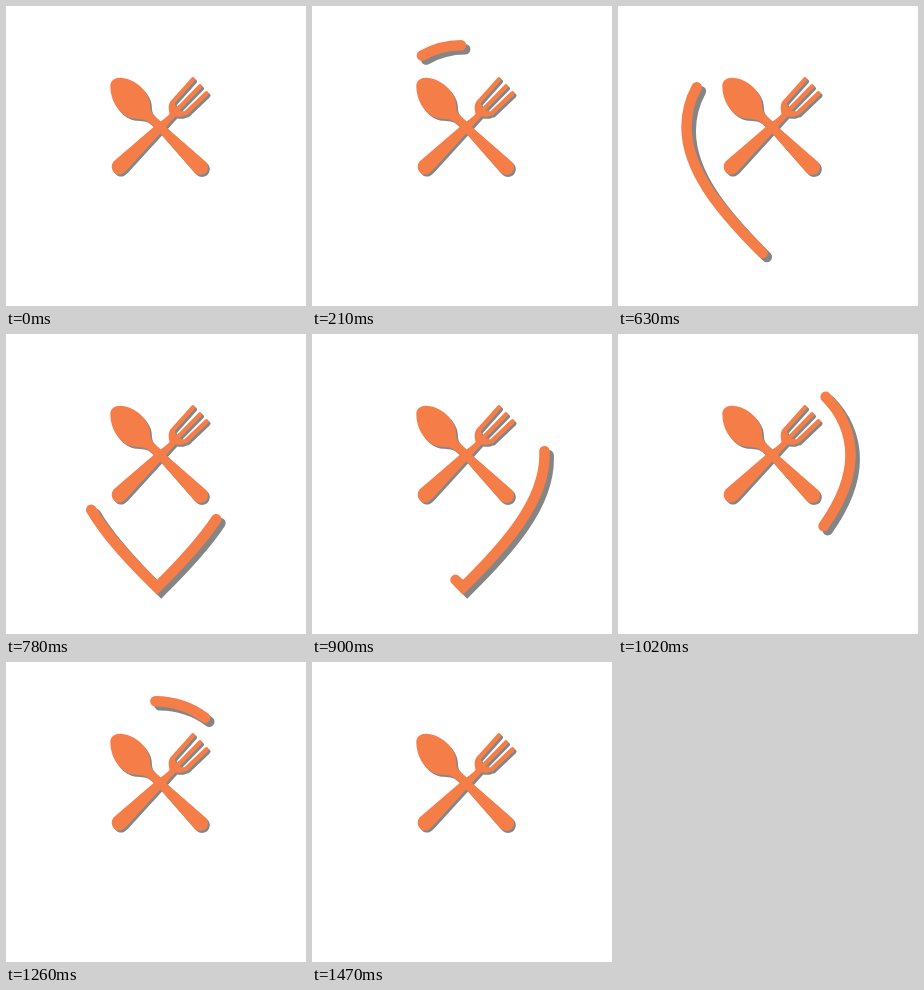
These frames come from a looping animation (300 by 300 pixels, 1.8 s). An HTML page with a canvas:

```html
<!DOCTYPE html>
<html lang="en">
<head>
<meta charset="utf-8">
<title>Restaurant pin loader</title>
<style>
  html, body { margin: 0; width: 100%; height: 100%; overflow: hidden; background: #fff; }
  canvas { display: block; }
</style>
</head>
<body>
<canvas id="stage" width="300" height="300"></canvas>
<script>
const ctx = document.getElementById('stage').getContext('2d');
const LOOP = 1800, STEP = 30;
const ORANGE = '#f57d48', SHADOW = '#858585';

// Map pin outline, counterclockwise from the top
const pinData = 'M149 39.3 A80.5 82 0 0 0 68.5 121.3 C68.5 168 109 212 151 253.3' +
  ' C193 212 232.5 168 232.5 121.3 A83.5 82 0 0 0 149 39.3';
const pin = new Path2D(pinData);
const pinShape = document.createElementNS('http://www.w3.org/2000/svg', 'path');
pinShape.setAttribute('d', pinData);
const pinLength = pinShape.getTotalLength();

const spoon = new Path2D('M104.3 80 C104.3 74 110 71 116 72 C129 73 140 84 143 93' +
  ' C145 99 143 104 147 108 C150 112 154 114 157 118.5 L200 156' +
  ' C203.5 160 202 165 199 167.5 C195 170 191 169 188 166 L153 126' +
  ' C149 122 146 118.5 141 115 C135 111.5 130 114.5 123 111.5 C112 107 104.3 94 104.3 80Z');
const fork = new Path2D('M107.5 155.5 L150 119 C155 115 161 111 163.5 108' +
  ' C163 104 161.5 100 164.5 95.5 L169 97.5 L171 104 L177 105 L182 107' +
  ' C178 111.5 174 111 169.5 110.5 C166 114 162 119 157 124.5 L120 165' +
  ' C116 169.5 111 169.5 108.5 166.5 C105 164 105 159 107.5 155.5Z');
const tines = new Path2D('M166 97 L187 73.5 M171.5 103.5 L194 80.5 M180 107 L200.5 87.5');

function withShadow(dx, dy, draw) {
  for (const [color, x, y] of [[SHADOW, dx, dy], [ORANGE, 0, 0]]) {
    ctx.save();
    ctx.translate(x, y);
    ctx.fillStyle = ctx.strokeStyle = color;
    draw();
    ctx.restore();
  }
}

function drawCutlery() {
  ctx.fill(spoon);
  ctx.fill(fork);
  ctx.lineWidth = 4.5;
  ctx.lineCap = 'round';
  ctx.stroke(tines);
}

function ease(t, start, end) {
  const u = Math.min(1, Math.max(0, (t - start) / (end - start)));
  return u * u * (3 - 2 * u);
}

function drawPin(t) {
  const tail = ease(t, 360, 1470) * pinLength;
  const head = ease(t, 0, 1290) * pinLength;
  if (head <= tail) return;
  ctx.lineWidth = 10.5;
  ctx.lineCap = 'round';
  ctx.lineJoin = 'miter';
  ctx.setLineDash([head - tail, pinLength * 2]);
  ctx.lineDashOffset = -tail;
  ctx.stroke(pin);
}

function render(now) {
  const t = Math.floor((now % LOOP) / STEP) * STEP;
  ctx.fillStyle = '#fff';
  ctx.fillRect(0, 0, 300, 300);
  withShadow(4.2, 4, () => drawPin(t));
  withShadow(1.8, 2, drawCutlery);
}

let origin;
function tick(now) {
  origin ??= now;
  render(now - origin);
  requestAnimationFrame(tick);
}
render(0);
requestAnimationFrame(tick);
</script>
</body>
</html>
```
